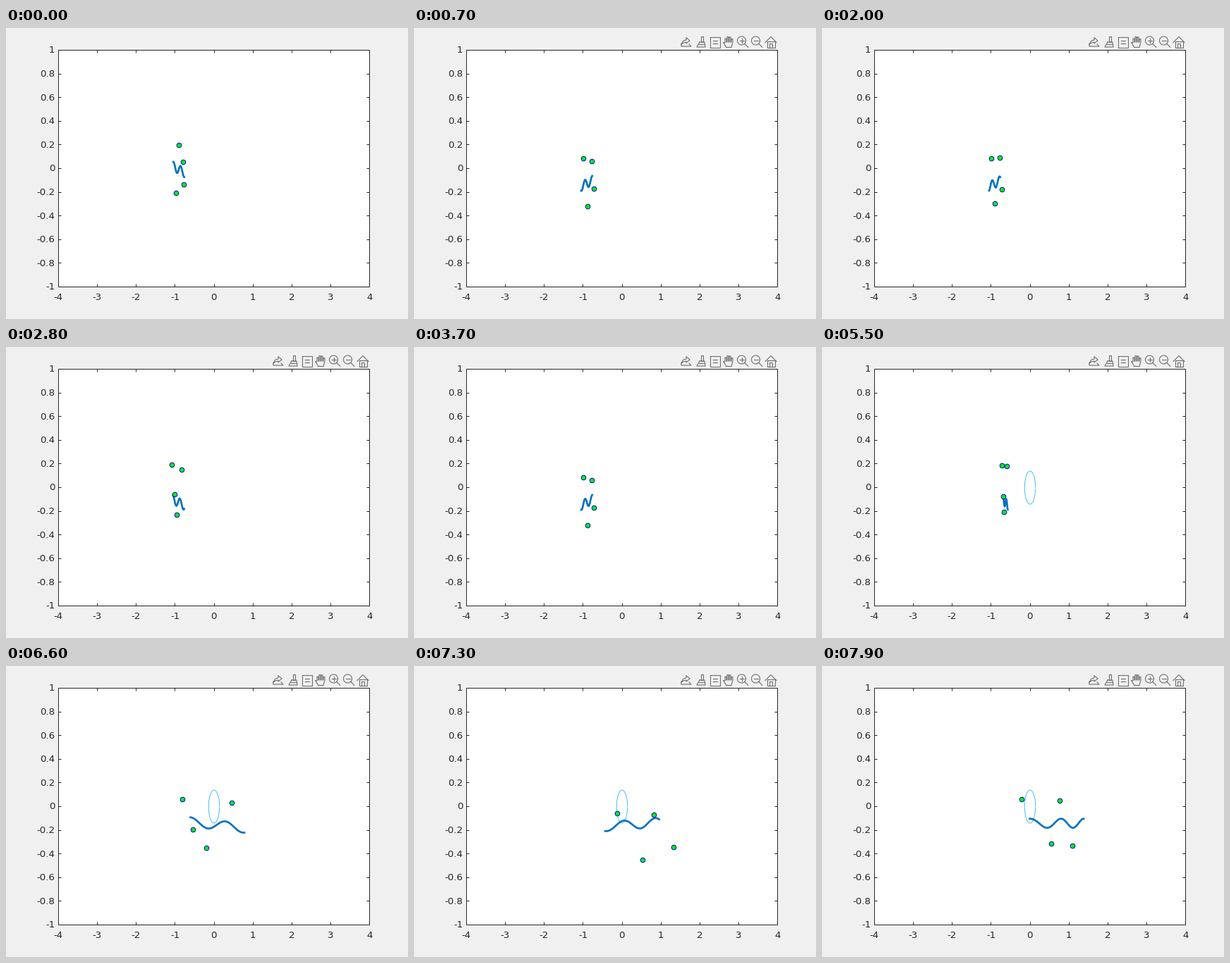
A matplotlib script that plays this animation: 570 by 413 pixels, repeating every 8 s.

```python
import numpy as np
import matplotlib.pyplot as plt
from matplotlib.animation import FuncAnimation
from matplotlib.patches import Rectangle

W, H, DPI = 570, 413, 100
FRAMES, STEP = 80, 100
PT = 72 / DPI  # points per pixel
INK, GREY, BLUE, SKY = "#262626", "#6e6e6e", "#0072BD", "#4DBEEE"
L, R, T, B = 74, 515, 31, 367

fig = plt.figure(figsize=(W / DPI, H / DPI), dpi=DPI, facecolor="#f0f0f0")
ax = fig.add_axes([0, 0, 1, 1])
ax.set(xlim=(0, W), ylim=(H, 0))
ax.axis("off")


def stroke(x, y, color=INK, width=1.0, **kw):
    return ax.plot(x, y, color=color, lw=width * PT, **kw)[0]


def label(x, base, text, align):
    ax.text(x, base, text, ha=align, va="baseline", color=INK,
            fontsize=13.33 * PT, family="DejaVu Sans")


def draw_axes():
    ax.add_patch(Rectangle((L, T), R - L, B - T, fc="white", ec=INK,
                           lw=PT, zorder=0))
    for k, x in enumerate(np.linspace(L, R, 9)):
        for y, d in ((T, 4), (B, -4)):
            stroke([x, x], [y, y + d], solid_capstyle="butt")
        label(x + .3, 386, f"{k - 4}", "center")
    for k, y in enumerate(np.linspace(T, B, 11)):
        for x, d in ((L, 4), (R, -4)):
            stroke([x, x + d], [y, y], solid_capstyle="butt")
        label(69.3, y + 4.4, f"{(5 - k) / 5:g}", "right")


def draw_toolbar():
    icons = []

    def pen(*pts):
        x, y = zip(*pts)
        icons.append(stroke(x, y, GREY, 1.1, solid_joinstyle="round"))

    def box(x, y, w, h):
        pen((x, y), (x + w, y), (x + w, y + h), (x, y + h), (x, y))

    # export
    pen((379, 23), (382, 18), (386, 17), (386, 13.5), (391, 18),
        (386, 22), (386, 20), (382, 21), (379, 23))
    pen((379, 23), (379, 26), (393, 26), (390, 23))
    # brush
    box(406.5, 12, 3.5, 8)
    pen((405, 20), (412, 20), (413, 27), (401, 27), (405, 20))
    pen((404, 23), (412, 23))
    # data tip
    box(419.5, 12.5, 14, 15)
    for y in (18, 22):
        pen((423.5, y), (430, y))
    # hand
    fingers = [(441 + 3 * k, top) for k, top in enumerate((15, 12.5, 13, 15.5))]
    tips = [(x + dx, y) for x, top in fingers
            for dx, y in ((0, 20), (0, top), (2, top), (2, 20))]
    pen((443, 27.5), (438.5, 20.5), (441, 21), *tips, (450, 27.5), (443, 27.5))
    # zoom in and out
    a = np.linspace(0, 2 * np.pi, 30)
    for x in (464.5, 484.5):
        pen(*zip(x + 6 * np.cos(a), 18 + 6 * np.sin(a)))
        pen((x + 4.3, 22.3), (x + 9.3, 27.3))
        pen((x - 3, 18), (x + 3, 18))
    pen((464.5, 15), (464.5, 21))
    # home
    pen((498, 20.5), (506, 12.5), (514, 20.5))
    box(500.5, 18.5, 11, 9)
    box(504, 22, 4, 5.5)
    return icons


# Four feet: x in body lengths from the tail, y in pixels
FOOT_X = np.array([.04, .87, .62, .42])
STRIDE = np.array([.19, .10, .57, .13])
FOOT_Y = np.array([176, 179, 219, 243.5])
LIFT, PEAK = 10, np.array([.50, .60, .47, .60])
# Offsets that fade out at the start and build up in the final glide
START = np.array([[10, 2, 14, -1], [0, 20, 12, 0]])
GLIDE = np.array([[0, -.22, .35, .5], [0, -3, 20, -3]])

TAU = 2 * np.pi
U = np.linspace(0, 1, 80)


def ease(x):
    x = np.clip(x, 0, 1)
    return x * x * (3 - 2 * x)


def gait_phase(t):
    """Cycles walked; the gait lags for a while around 3.7 s."""
    return .04 + .755 * t - .28 * np.exp(-((t - 3.7) / 1.8) ** 2)


def pose(t):
    p = gait_phase(t)
    start = 1 - ease(t / .7)
    drop = ease((t - 5.5) / 1.1)
    glide = np.clip((t - 6.6) / 1.3, 0, 1) ** 2

    if t < 6.35:
        squeeze = ease((t - 4.2) / 1.2)
        tail, length = 237 + 19.2 * squeeze, 15.7 - 8.5 * squeeze
    else:
        tail, length = 261.5 + 33 * glide, 76.5

    fx = FOOT_X - STRIDE * np.cos(TAU * p) + GLIDE[0] * glide
    fx = tail + length * fx + START[0] * start
    fy = FOOT_Y + LIFT * np.cos(TAU * (p - PEAK)) + 23 * drop
    fy = fy + START[1] * start + GLIDE[1] * glide

    slope = 9 * np.cos(TAU * p) * (1 - glide)
    cycle = (1.55 + .45 * glide) * U - .65 * glide * U * (1 - U) - p
    by = 220.7 - 20 * start + 5 * drop - 2.5 * glide
    by = by + slope * (U - .5) - 6.5 * np.cos(TAU * cycle)
    return (fx, fy), (tail + length * U, by)


draw_axes()
toolbar = draw_toolbar()
a = np.arange(0, 6.21, .1)
ring = stroke(295 + 7.7 * np.cos(a), 199.5 - 23.5 * np.sin(a), SKY)
body = stroke([], [], BLUE, 2.67)
feet = ax.plot([], [], "o", ms=6.6 * PT, mfc="#00ff00", mec="#0000d8",
               mew=PT, zorder=5)[0]


def update(i):
    t = i * STEP / 1000
    foot_xy, body_xy = pose(t)
    feet.set_data(*foot_xy)
    body.set_data(*body_xy)
    ring.set_visible(t >= 5)
    for icon in toolbar:
        icon.set_visible(i >= 3)
    return [body, feet, ring, *toolbar]


anim = FuncAnimation(fig, update, frames=FRAMES, interval=STEP,
                     init_func=lambda: update(0), repeat=True, repeat_delay=0)
plt.show()
```
